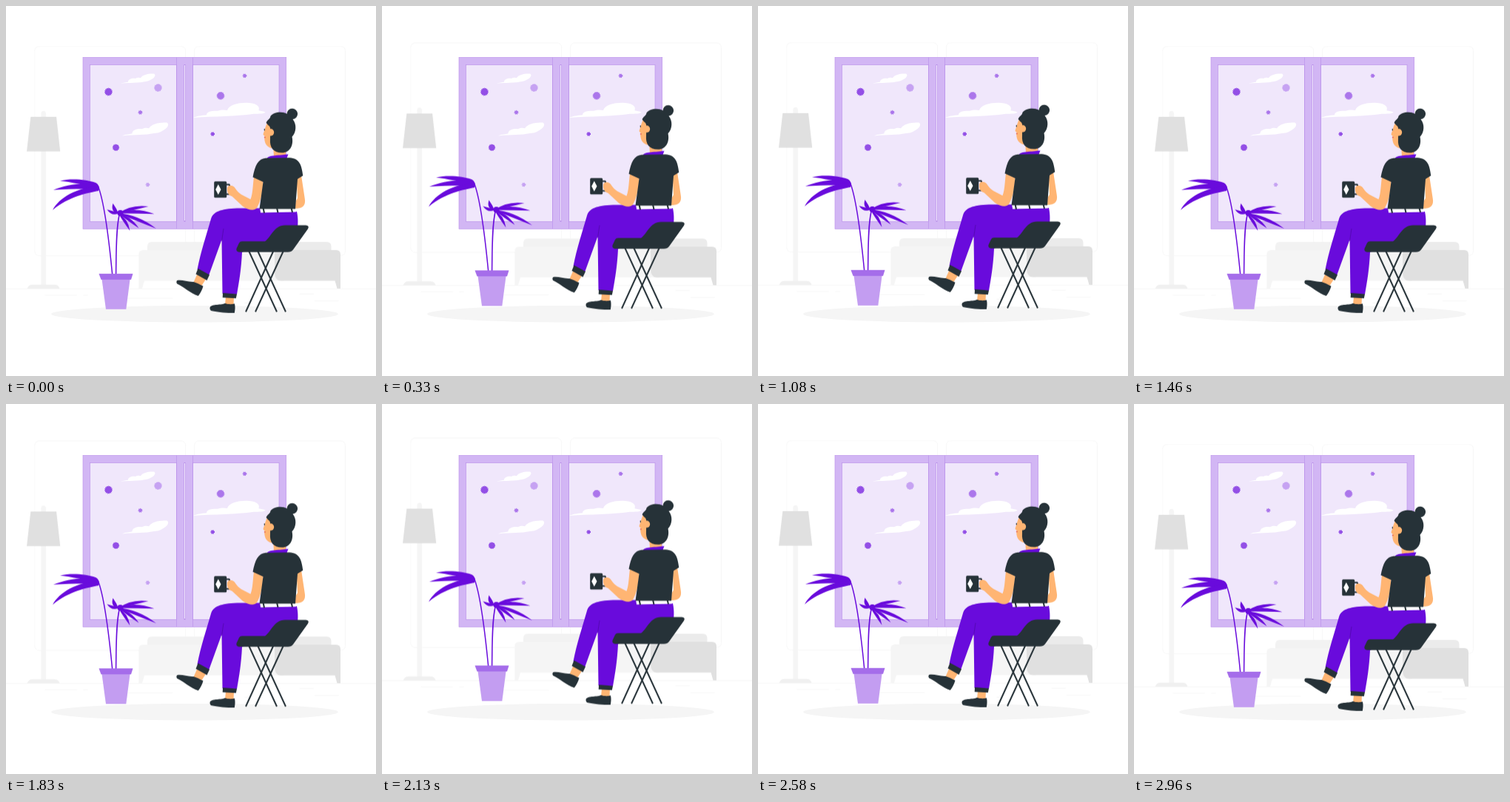
An HTML page that plays this animation: 500 by 500 pixels, repeating every 3 s.

```html
<!DOCTYPE html>
<html lang="en">
<head>
<meta charset="utf-8">
<title>Looking out of the window</title>
<style>
  html, body { margin: 0; width: 100%; height: 100%; overflow: hidden; background: #fff; }
  svg { display: block; width: 100vw; height: 100vh; }
  .violet { fill: #690bdc; }
  .dark { fill: #263238; }
  .skin { fill: #ffb573; }
  .line { fill: none; stroke: #263238; stroke-width: 2; }
  .hair { fill: none; stroke: #e4e4e4; stroke-width: .3; }
</style>
</head>
<body>
<svg viewBox="0 0 500 500">
  <!-- room -->
  <g class="float">
    <g class="hair">
      <rect x="38.8" y="54.8" width="203.8" height="282.8" rx="5.6"/>
      <rect x="254.6" y="54.8" width="203.8" height="282.8" rx="5.6"/>
      <path d="M0 382.4H500M416.8 398.6h33M322.5 401.3h8.7M396.6 389.3h19.2M52.5 391h43.2M104.6 391h6.3M131.5 395.2h93.7"/>
    </g>
    <path fill="#f5f5f5" d="M47.3 378V146a3.3 4 0 0 1 6.6 0V378z"/>
    <path fill="#f0f0f0" d="M28.5 382C30 378.500 32 376.700 36 376.700H65C69 376.700 71.500 378.500 72.500 382z"/>
    <path fill="#e0e0e0" d="M33.300 150H68L73.200 196.700H28z"/>
    <path fill="#f2f2f2" d="M191 330.500V325Q191 319 197 319H365V330.500z"/>
    <path fill="#ebebeb" d="M363 330.500V319H433Q439.500 319 439.500 325V330.500z"/>
    <path fill="#f5f5f5" d="M179.300 382V336Q179.300 330 185.500 330H375V371.500H187L184 382z"/>
    <path fill="#e0e0e0" d="M363 360V336Q363 330 369 330H446Q452 330 452 336V382H447.500L444.500 371.500H371Q363 371 363 360z"/>
  </g>

  <!-- window -->
  <g stroke="#b88de9" stroke-width=".6">
    <rect x="104" y="69.500" width="274.700" height="231.700" fill="#d2b6f4"/>
    <g fill="#f0e7fb">
      <rect x="113.500" y="79.500" width="117" height="211.700"/>
      <rect x="252.500" y="79.500" width="116.500" height="211.700"/>
    </g>
    <path fill="none" d="M230.500 69.500V301M252.500 69.500V301"/>
    <rect x="240.700" y="79.500" width="1.700" height="211.700" fill="#f0e7fb"/>
  </g>
  <g id="spores"></g>
  <g fill="#fff">
    <path id="cloud" d="M155 104.800C159 103.300 162 103.200 165 102.700C165 98.500 171 97 175 98C178 96.500 180 96.700 182 97.300C184 93 193 91 200 91.500C203 93 201 97.500 195.500 99.800C193 101.500 190 102 187 102.300C178 104.300 168 103.500 155 104.800z"/>
    <use href="#cloud" transform="translate(157 175) scale(1.340) translate(-155 -104.500)"/>
    <path d="M253 151C257 149 264 148 271 147.300C271 142 280 141.500 286 141.800C290 140.300 295 140 299 141C301 134 312 130.800 325 130.800C336 131 344 134.500 341.500 141C342 142 348 142 350.500 143.500C349 146 342 145.500 335 145.800C310 149.500 280 149 253 151z"/>
  </g>

  <ellipse cx="255" cy="416.200" rx="194" ry="11.300" fill="#f5f5f5"/>

  <g class="float">
    <!-- plant -->
    <g fill="none" stroke="#690bdc" stroke-width="1.500">
      <path d="M143.700 363C140 325 134 268 124.500 244"/>
      <path d="M148.600 363C149 335 148.500 300 153.500 281"/>
    </g>
    <g class="violet">
      <path d="M73 236.600C88 232.500 110 235 121 239C125 241 126.500 245 126 249L118 243C105 243 88 238 73 236.600z"/>
      <path d="M64 248.800C80 242 100 238.500 123 241.500L125 248C108 247 86 247.500 64 248.800z"/>
      <path d="M63 276C72 259 95 246 125 243.500L125 250C110 253 86 257 63 276z"/>
      <g id="fan"></g>
    </g>
    <path fill="#c39df1" d="M129.300 368H167.800L162.300 410H135z"/>
    <path fill="#a56dea" d="M125.500 362H171.500L169 370H128.500z"/>

    <!-- stool legs -->
    <path class="line" d="M328 331L366 413.500M340 331L378 413.500M361.500 331L324 413.500M375 331L337 413.500"/>

    <!-- feet -->
    <path class="skin" d="M259 361L271 368L264.500 378L253.500 373.500z"/>
    <path class="skin" d="M297 393H308L307.500 404H296z"/>
    <path class="dark" d="M231 371.300C237 369.500 245 373.500 253.500 373C258 374.500 262 376.500 266.500 378.800C265 384 263 388 259.800 392C249 388.500 240 379.500 231 375.500Q229.500 373 231 371.300z"/>
    <path class="dark" d="M275.500 408C277 402.500 289 405 296 402C300 403.500 305 403.500 309 402.500C310 407 309.500 411 308.800 415C297 415.500 284 413.500 277 412Q275 410.500 275.500 408z"/>

    <!-- trousers -->
    <path class="violet" d="M277 288C280 278 290 274.500 312 273.500L343 273.500L345 279L393 278C395 287 394.500 294 394 302L350 320L319 333C318 355 315 373 312 390L292.500 389L291.500 316L274 364.500L258.500 356.500C263 333 271 309 277 288z"/>
    <path fill="none" stroke="#4a089b" stroke-width=".6" d="M291.500 318L294 301"/>
    <path class="dark" d="M259.500 355L275 363.500L271.500 371L256.500 362.500z"/>
    <path class="dark" d="M293 388L312 389.500L310.800 395.300L292.700 394.300z"/>
    <path fill="#fff" d="M343 272H391.500L392 278.500L344 279.500z"/>
    <path class="line" d="M347.500 273L349 280M366 273L367.500 279.500M385.500 273L387 279"/>

    <!-- seat -->
    <path class="dark" d="M311.500 328L315 320.500Q316 318.300 319 318.300H350C358 313 362 296.500 377 296.500H405Q410.500 297 408 301.500L388 329.500Q385.500 332.700 381 332.700H315Q310.500 332 311.500 328z"/>

    <!-- arms and mug -->
    <path class="line" d="M297 241.500H301.500Q304.500 248 301.500 254.500H297"/>
    <rect class="dark" x="281.200" y="237.300" width="17" height="22" rx="1.500"/>
    <path fill="#fff" d="M286.800 241.300L290.500 248.300L286.800 255.300L283.200 248.300z"/>
    <path class="skin" d="M335 231L347.500 236C347 250 345 263 339 273C335 278 327 275.500 320 271L305.500 257.500C300 256 298.500 251 299 246C300.500 241.500 306 242 309 245.500C312 250 314 252.500 318 255L330.500 261.500C333.500 254 333.500 243 335 231z"/>
    <path class="skin" d="M392.500 231L399 229L403.700 260C405.500 270 401 274 390.500 274L391.500 264L394 260z"/>

    <!-- head -->
    <path class="skin" d="M361 188H378V204H362z"/>
    <path class="skin" d="M353 158C350.500 163 349.500 168 347.500 173.500Q347.500 175 349.300 175.500C348.700 183 350.500 190 358.500 192.500L367 188V158z"/>
    <path class="dark" d="M351.500 158C354 153 357 153 357.500 149C362 143 374 142.300 379.500 146A7.300 7.300 0 1 1 387.500 153.300C393 160 392.500 171 386.500 177C389 188 384 198.500 373 198.500C361 198.500 356 191 357 180C357 174 359 163 354.500 161.500z"/>
    <ellipse class="skin" cx="358" cy="171" rx="4.200" ry="4.700"/>
    <path class="line" style="stroke-width:1.200" d="M349.300 166.200V168.500"/>
    <path fill="none" stroke="#d9454c" d="M348.800 177.800H350.800"/>

    <!-- top -->
    <path class="violet" d="M352.500 206.500C355 201 370 202.500 381.500 200.500L379 207z"/>
    <path class="dark" d="M351 205.700C341 206.500 336.500 215 333.500 231.500L347.500 238L342.500 274.500H391L394 234L401.300 229.500C399.500 215 396.500 206 383 205.300z"/>
  </g>
</svg>

<script>
  const mix = a => '#' + [105, 11, 220]
    .map(c => Math.round(255 - (255 - c) * a).toString(16).padStart(2, '0')).join('');

  // x, y, radius, strength
  const spores = [
    [138.500, 116, 5, .72], [205.500, 110.500, 5, .38], [181.500, 143.800, 2.6, .56],
    [148.500, 191.300, 4.300, .72], [191.500, 241.500, 2.500, .38], [322.500, 94.300, 2.500, .56],
    [290, 121.300, 5, .56], [279.200, 173, 2.500, .72]
  ];
  document.getElementById('spores').innerHTML = spores.map(([x, y, r, a]) =>
    `<circle cx="${x}" cy="${y}" r="${r - .3}" fill="${mix(a)}" stroke="${mix(a)}"
      stroke-width="1.400" stroke-dasharray="1 .9"/>`).join('');

  // A leaf runs from its root to its tip, arched by bend and as thick as 2 * half.
  function leaf(x, y, tx, ty, half, bend) {
    const dx = tx - x, dy = ty - y, len = Math.hypot(dx, dy);
    const ctrl = k => `${x + dx * .45 + dy / len * k} ${y + dy * .45 - dx / len * k}`;
    return `<path d="M${x} ${y}Q${ctrl(bend + half)} ${tx} ${ty}Q${ctrl(bend - half)} ${x} ${y}z"/>`;
  }
  const leaves = [
    [144.500, 267, 5, 4], [136.500, 275.300, 4, 3], [192.500, 271, 4.500, 4], [200.500, 281.300, 4.500, 5],
    [203, 301, 4.500, 4], [179.500, 300.500, 4, 3], [167.500, 304, 4, 3]
  ];
  document.getElementById('fan').innerHTML =
    leaves.map(([tx, ty, half, bend]) => leaf(152, 280.500, tx, ty, half, bend)).join('') +
    '<circle cx="154.500" cy="280" r="4"/>';

  // Linear bob of 10 units, drawn at 24 pictures a second and sampled mid-picture.
  const steps = 36, half = .5 / steps, edge = -20 * half;
  const at = (offset, y) => ({ offset, transform: `translateY(${y}px)` });
  for (const el of document.querySelectorAll('.float')) {
    el.animate([at(0, edge), at(.5 - half, -10), at(1 - half, 0), at(1, edge)], {
      duration: 1500, iterations: Infinity, iterationStart: .003, easing: `steps(${steps})`
    });
  }
</script>
</body>
</html>
```
